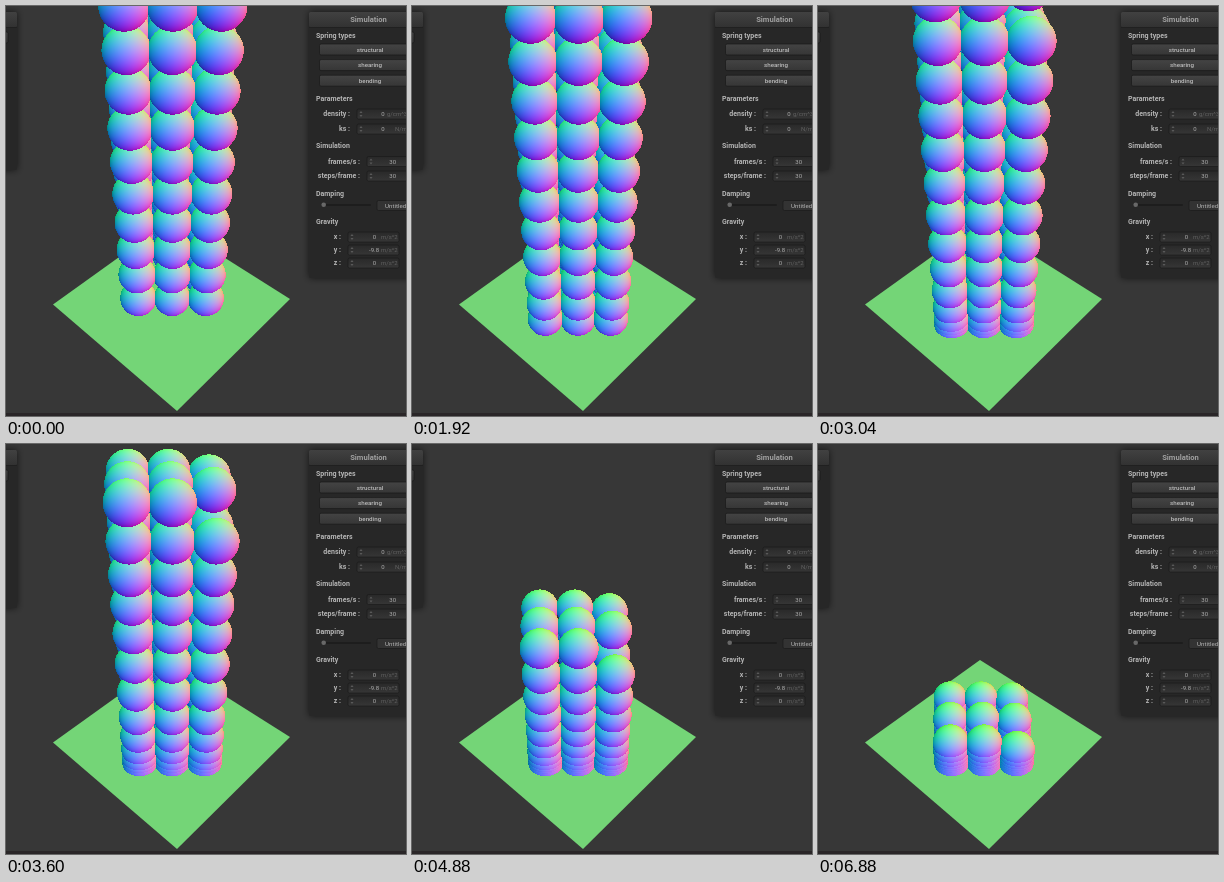
An HTML page with a canvas that plays this animation: 400 px wide and 410 px high, repeating every 6960 ms.

```html
<!DOCTYPE html>
<html lang="en">
<head>
<meta charset="utf-8">
<title>Falling particles</title>
<style>
html, body { margin: 0; width: 100%; height: 100%; overflow: hidden; background: #373737; }
canvas { display: block; width: 400px; height: 410px; }
</style>
</head>
<body>
<canvas id="stage" width="400" height="410"></canvas>
<script>
const W = 400, H = 410, LOOP = 6960, STEP = 80;
const ctx = document.getElementById('stage').getContext('2d');

// Camera: focal length, pitch, principal point, height of the ground centre
const F = 605, PITCH = 0.677, CX = 164.4, CY = 203, GROUND = 0.153;
const SIN = Math.sin(PITCH), COS = Math.cos(PITCH);
const SHADE_PITCH = PITCH - 0.2;

// Particle lattice
const LAYERS = 14, GAP = 0.05, SIDE = 0.0515, RADIUS = 0.0275, BASE = 0.0624;

// Distance fallen: [seconds, distance]
const FALL = [[0, 0], [1.12, 0.015], [1.92, 0.064], [3.04, 0.19], [4.24, 0.367], [5.52, 0.598], [6.96, 0.81]];

function slope(i) {
  if (i === 0) return 0;
  const a = FALL[i - 1], b = FALL[Math.min(i + 1, FALL.length - 1)];
  return (b[1] - a[1]) / (b[0] - a[0]);
}

function fallen(t) {
  let i = 0;
  while (i < FALL.length - 2 && t > FALL[i + 1][0]) i++;
  const [t0, a] = FALL[i], [t1, b] = FALL[i + 1];
  const d = t1 - t0, u = (t - t0) / d, v = 1 - u;
  return v * v * (1 + 2 * u) * a + u * u * (3 - 2 * u) * b
    + d * u * v * (v * slope(i) - u * slope(i + 1));
}

const bell = (x, width) => Math.exp(-((x / width) ** 2));

// Free fall with a passing compression wave, cushioned by a pile that spreads over time
function height(layer, t, drop, sag) {
  const wave = 0.016 * bell(t - 4, 1.2) * bell(layer - 9, 2);
  const cushion = 0.001 + 0.0098 * t ** 1.3;
  const free = BASE + layer * GAP - drop - sag + wave;
  return Math.max(free, 0) + cushion * Math.log(1 + Math.exp(-Math.abs(free) / cushion));
}

const layer3d = document.createElement('canvas');
layer3d.width = W;
layer3d.height = H;
const lctx = layer3d.getContext('2d');
const image = lctx.createImageData(W, H);
const depth = new Float32Array(W * H);

function ball(x, h, toward) {
  const Z = 1 - toward * COS - h * SIN;
  const X = x + toward * 0.05, Y = GROUND + toward * SIN - h * COS;
  const px = CX + F * X / Z, py = CY + F * Y / Z, r = F * RADIUS / Z;
  const ray = Math.atan(Y / Z);
  const st = Math.sin(PITCH + ray), ct = Math.cos(PITCH + ray);
  const ss = Math.sin(SHADE_PITCH + ray), cs = Math.cos(SHADE_PITCH + ray);
  const turn = Math.atan(X / Z), sa = Math.sin(turn), ca = Math.cos(turn);
  const x0 = Math.max(0, Math.floor(px - r)), x1 = Math.min(W - 1, Math.ceil(px + r));
  const y0 = Math.max(0, Math.floor(py - r)), y1 = Math.min(H - 1, Math.ceil(py + r));
  for (let j = y0; j <= y1; j++) {
    for (let i = x0; i <= x1; i++) {
      const nx = (i + 0.5 - px) / r, ny = (py - j - 0.5) / r;
      const rr = nx * nx + ny * ny;
      if (rr > 1) continue;
      const nz = Math.sqrt(1 - rr);
      if (h + RADIUS * (ny * ct + nz * st) < 0) continue;
      const z = Z - RADIUS * nz, k = j * W + i;
      if (z >= depth[k]) continue;
      depth[k] = z;
      const p = k * 4;
      image.data[p] = 127.5 * (1 + nx * ca - nz * sa);
      image.data[p + 1] = 127.5 * (1 + ny * cs + nz * ss);
      image.data[p + 2] = 127.5 * (1 + nz * cs - ny * ss);
      image.data[p + 3] = 255;
    }
  }
}

function particles(t) {
  depth.fill(9);
  image.data.fill(0);
  const drop = fallen(t);
  for (let row = -1; row <= 1; row++) {
    for (let col = -1; col <= 1; col++) {
      const corner = row === 1 && col === 1;
      const sag = (row < 0 ? 0.004 : 0) + (col === 1 && !corner ? 0.007 : 0);
      const count = corner ? LAYERS - 1 : LAYERS;
      for (let i = 0; i < count; i++) ball(col * SIDE, height(i, t, drop, sag), row * GAP);
    }
  }
  lctx.putImageData(image, 0, 0);
  ctx.drawImage(layer3d, 0, 0);
}

function fade(y, h, top, bottom) {
  const g = ctx.createLinearGradient(0, y, 0, y + h);
  g.addColorStop(0, top);
  g.addColorStop(1, bottom);
  return g;
}

function box(x, y, w, h, fill, edge) {
  ctx.beginPath();
  ctx.roundRect(x, y, w, h, 1.5);
  ctx.fillStyle = fill;
  ctx.fill();
  if (edge) {
    ctx.strokeStyle = edge;
    ctx.lineWidth = 0.7;
    ctx.stroke();
  }
}

function text(s, x, y, align = 'left', color = '#b4b4b4', size = 7, weight = 700) {
  ctx.font = `${weight} ${size}px Roboto, sans-serif`;
  ctx.textAlign = align;
  ctx.textBaseline = 'middle';
  ctx.fillStyle = color;
  ctx.fillText(s, x, y);
}

function panel(x, y, w, h) {
  ctx.save();
  ctx.shadowColor = 'rgba(0,0,0,.65)';
  ctx.shadowBlur = 7;
  box(x, y, w, h, '#272727');
  ctx.restore();
  box(x, y, w, 15, fade(y, 15, '#414141', '#323232'));
  ctx.fillStyle = '#1e1e1e';
  ctx.fillRect(x, y + 15, w, 0.8);
}

function button(x, y, w, label, cx) {
  box(x, y, w, 11, fade(y, 11, '#444444', '#363636'), '#191919');
  if (label) text(label, cx, y + 5.7, 'center', '#bcbcbc', 6.2, 500);
}

function field(label, y, end, x, w, value, vx, unit, ux) {
  text(label + ' :', end, y, 'right');
  box(x, y - 5, w, 10, fade(y - 5, 10, '#292929', '#363636'), '#1b1b1b');
  ctx.fillStyle = '#5b5b5b';
  for (const d of [-1, 1]) {
    ctx.beginPath();
    ctx.moveTo(x + 2.5, y + d);
    ctx.lineTo(x + 5.5, y + d);
    ctx.lineTo(x + 4, y + d * 3);
    ctx.fill();
  }
  text(value, vx, y + 0.5, 'right', '#b0b0b0', 6, 400);
  if (unit) text(unit, ux, y + 0.5, 'left', '#606060', 6, 400);
}

function controls() {
  panel(-20, 6, 31, 158);
  button(-10, 26, 12);
  panel(303, 6, 118, 266);
  text('Simulation', 362.5, 13.5, 'center', '#a0a0a0', 7.6);

  text('Spring types', 310, 30);
  ['structural', 'shearing', 'bending'].forEach((s, i) => button(313.5, 38 + i * 15.6, 101, s, 364));

  text('Parameters', 310, 92.5);
  field('density', 108, 344, 351, 60, '0', 378.5, 'g/cm^3', 381);
  field('ks', 123, 344, 351, 60, '0', 378.5, 'N/m', 389);

  text('Simulation', 310, 140);
  field('frames/s', 155.5, 354, 361, 50, '30', 390);
  field('steps/frame', 170, 354, 361, 50, '30', 390);

  text('Damping', 310, 187.5);
  box(316, 198, 49, 2, '#1d1d1d');
  ctx.beginPath();
  ctx.arc(317.7, 198.7, 2.3, 0, 7);
  ctx.fillStyle = '#686868';
  ctx.fill();
  box(371, 194.5, 45, 10, '#333333', '#1b1b1b');
  text('Untitled', 379, 199.8, 'left', '#b4b4b4', 6.2, 400);

  text('Gravity', 310, 216);
  field('x', 231, 335, 342, 51, '0', 370, 'm/s^2', 375);
  field('y', 244, 335, 342, 51, '-9.8', 373, 'm/s^2', 375);
  field('z', 257, 335, 342, 51, '0', 370, 'm/s^2', 375);
}

function ground() {
  ctx.beginPath();
  ctx.moveTo(162, 216);
  ctx.lineTo(284, 293);
  ctx.lineTo(171, 405);
  ctx.lineTo(47, 298.5);
  ctx.fillStyle = '#74d577';
  ctx.fill();
}

function draw(t) {
  ctx.fillStyle = '#373737';
  ctx.fillRect(0, 0, W, H);
  ctx.fillStyle = '#2a2628';
  ctx.fillRect(0, 407, W, 3);
  ground();
  particles(t);
  controls();
}

let start = null, shown = -1;
function tick(now) {
  if (start === null) start = now;
  const frame = Math.floor(((now - start) % LOOP) / STEP);
  if (frame !== shown) {
    shown = frame;
    draw(frame * STEP / 1000);
  }
  requestAnimationFrame(tick);
}
draw(0);
requestAnimationFrame(tick);
</script>
</body>
</html>
```
